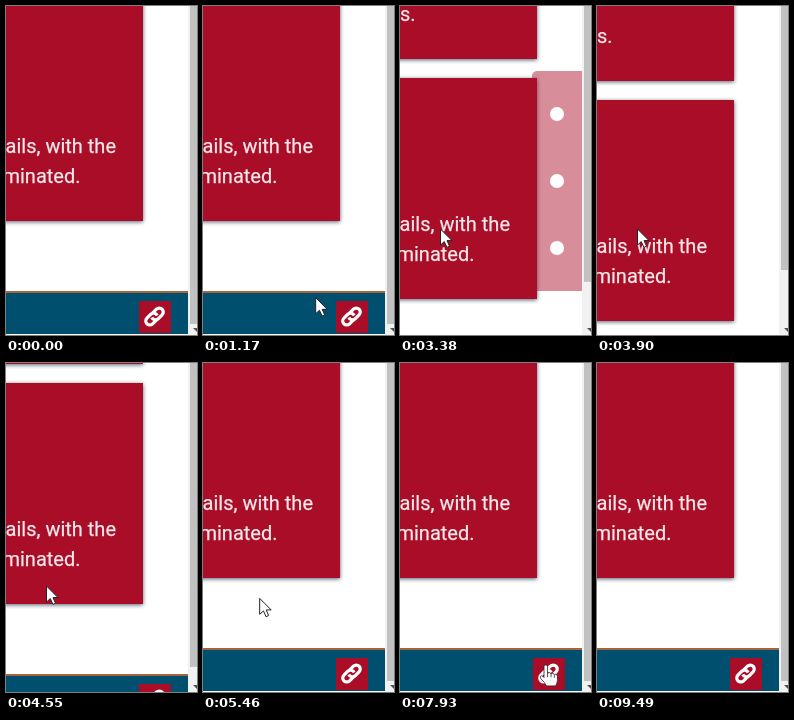
An HTML page that plays this animation: 191x329 px, repeating every 9620 ms.

```html
<!DOCTYPE html>
<html lang="en">
<head>
<meta charset="utf-8">
<title>Share panel</title>
<style>
  html, body { margin: 0; width: 100%; height: 100%; overflow: hidden; background: #fff; }
  svg { display: block; }
  text { font: 20px Roboto, sans-serif; fill: #f6e9eb; stroke: #f6e9eb; stroke-width: .25; text-anchor: end; }
  .card { fill: #aa0d27; filter: drop-shadow(0 1px 2px #273b52d0); }
</style>
</head>
<body>
<svg width="191" height="329" viewBox="0 0 191 329">
  <g id="page">
    <rect class="card" x="-60" y="-246" width="197" height="221"/>
    <text x="15.5" y="-63">s.</text>
    <rect class="card" x="-60" y="-6" width="197" height="221"/>
    <text x="110" y="147">ails, with the</text>
    <text x="74.5" y="177">minated.</text>
    <rect y="285" width="182" height="43" fill="#014f6e"/>
    <rect y="285" width="182" height="2" fill="#a8623c"/>
    <rect x="133" y="295" width="32" height="32" rx="1" fill="#aa0d27"/>
    <g transform="translate(148.5 310.5) rotate(-45)" fill="none" stroke="#fff" stroke-width="3.2">
      <path d="M-1 3.8H-6.5a4 4 0 0 1 0-8H-1a4 4 0 0 1 3.6 5.4"/>
      <path d="M1-3.8H6.5a4 4 0 0 1 0 8H1a4 4 0 0 1-3.6-5.4"/>
    </g>
  </g>

  <g id="panel">
    <path d="M182 65H137a5 5 0 0 0-5 5V285H182Z" fill="#aa0d27"/>
    <g fill="#fff">
      <circle cx="157" cy="108" r="7"/>
      <circle cx="157" cy="175" r="7"/>
      <circle cx="157" cy="242" r="7"/>
    </g>
  </g>

  <rect x="182" width="9" height="329" fill="#f1f1f1"/>
  <rect id="thumb" x="184" width="7" fill="#c1c1c1"/>
  <path d="M187 322h4v4Z" fill="#505050"/>

  <g id="cursor" fill="#fff" stroke="#222" stroke-linejoin="round">
    <path id="arrow" d="M0 0V16L3.8 12.6 6.4 18.4 9 17.2 6.5 11.6H11.5Z"/>
    <path id="hand" transform="scale(1.1)" stroke-width=".7" d="M0 1.5a1.6 1.6 0 0 1 3.2 0V7.5q1.8-1.4 3.2.4 1.8-1 3 .6 2.3-.8 2.8 1.5V14q0 2-1.6 5H2.2Q1 16-3 12.3q-1.3-2 .6-2.5Q-1 9.8 0 11.3ZM3.2 7.5V11M6.4 8V11.2M9.4 8.8V11.6"/>
  </g>
</svg>
<script>
  const LOOP = 9620, STEP = 130, FADE = 270, SCROLL = 100;
  const el = id => document.getElementById(id);

  const ramp = (t, start, duration) => Math.min(1, Math.max(0, (t - start) / duration));
  const easeOut = p => 1 - (1 - p) ** 2;
  const smooth = p => p * p * (3 - 2 * p);

  const outside = { x: -14, y: 250 };
  const button = { x: 144, y: 302 };
  const card = { x: 40.5, y: 223 };
  const gap = { x: 44.5, y: 241 };
  const moves = [
    { to: button, start: 520, duration: 910 },
    { to: card, start: 2340, duration: 520 },
    { to: button, start: 5330, duration: 520 },
    { to: gap, start: 6110, duration: 390 },
    { to: button, start: 6760, duration: 520 },
    { to: outside, start: 8190, duration: 780 },
  ];

  function cursorAt(t) {
    let { x, y } = outside;
    for (const { to, start, duration } of moves) {
      const p = smooth(ramp(t, start, duration));
      x += (to.x - x) * p;
      y += (to.y - y) * p;
    }
    return { x, y };
  }

  const scrollAt = t => SCROLL * (easeOut(ramp(t, 3250, 245)) - easeOut(ramp(t, 4310, 490)));

  const shown = (t, open, close) => ramp(t, open, FADE) - ramp(t, close, FADE);

  function draw(now) {
    const t = Math.floor(now % LOOP / STEP) * STEP;
    const offset = scrollAt(t);
    const { x, y } = cursorAt(t);
    const overButton = x > 133 && y > 295 + offset;
    el('page').setAttribute('transform', `translate(0 ${Math.round(offset)})`);
    el('panel').setAttribute('opacity', shown(t, 1693, 3235) + shown(t, 6000, 7500));
    el('thumb').setAttribute('height', 318 - offset * 0.54);
    el('cursor').setAttribute('transform', `translate(${x} ${y})`);
    el('arrow').style.display = overButton ? 'none' : '';
    el('hand').style.display = overButton ? '' : 'none';
  }

  const start = performance.now();
  function tick() {
    draw(performance.now() - start);
    requestAnimationFrame(tick);
  }
  tick();
</script>
</body>
</html>
```
